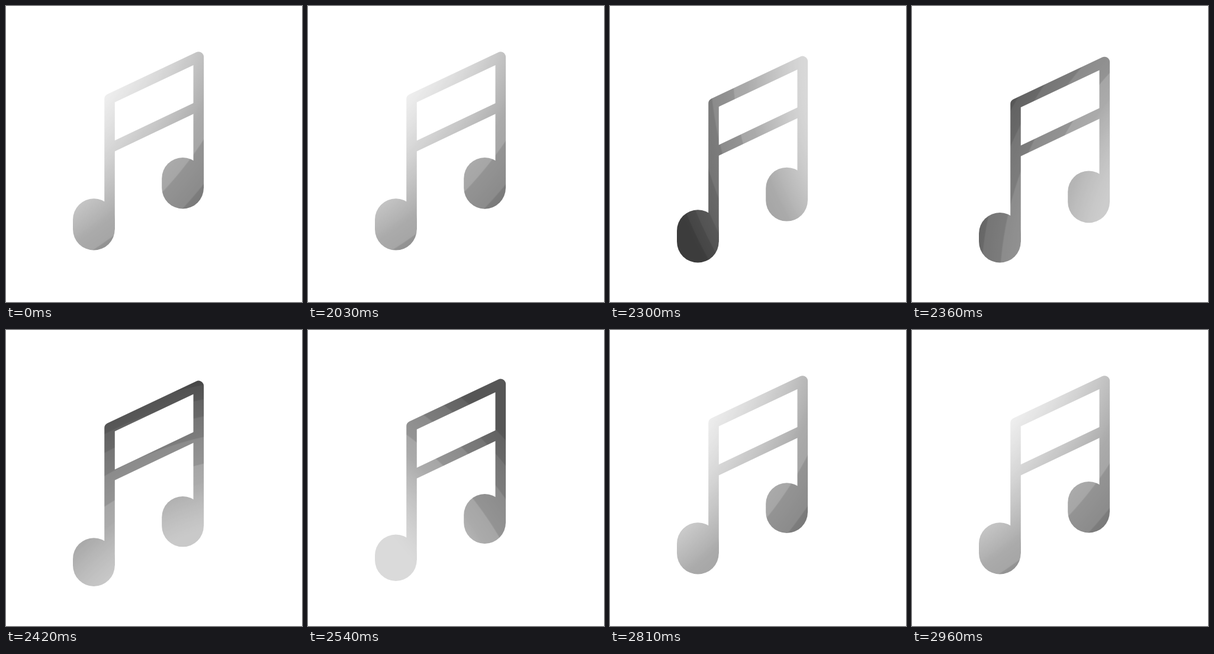
These frames come from a looping animation (500 by 500 pixels, 2.99 s). An HTML page with a canvas:

```html
<!DOCTYPE html>
<html lang="en">
<head>
<meta charset="utf-8">
<title>Music note</title>
<style>
  html, body { margin: 0; width: 100%; height: 100%; overflow: hidden; background: #fff; }
  canvas { display: block; width: 500px; height: 500px; }
</style>
</head>
<body>
<canvas id="stage" width="500" height="500"></canvas>
<script>
const ctx = document.getElementById('stage').getContext('2d');
const LOOP = 2990, START = 2030, END = 2960, TICK = 30;
const MID = { x: 223, y: 245 }, FAR = 560, REACH = 130;
const LEFT = 175, RIGHT = 325.3, HEAD = 70.8;

const clamp = u => Math.max(0, Math.min(1, u));
const smooth = u => u * u * (3 - 2 * u);
const smoother = u => u * u * u * (u * (6 * u - 15) + 10);

// Rises from 0 to 1, holds, and falls back to 0
const swell = (t, from, top, hold, to) =>
  smooth(clamp((t - from) / (top - from))) * smooth(clamp((to - t) / (to - hold)));

// One full turn that starts briskly and settles slowly
const turn = t => 41 + 360 * smoother(clamp((t - 2005) / 955) ** 0.75);

// Dark tones gather into bands of equal ratio
function banded(v) {
  if (v > 172) return v;
  const base = 60, ratio = 1.19;
  const band = base * ratio ** Math.round(Math.log(v / base) / Math.log(ratio));
  return v + (band - v) * 0.65;
}

// The light sits far off the stage and circles the note
function shade(t) {
  const a = turn(t) * Math.PI / 180;
  const x = MID.x - FAR * Math.cos(a), y = MID.y - FAR * Math.sin(a);
  const light = 245 - 44 * swell(t, 2150, 2400, 2410, 2720);
  const dark = 126 - 68 * swell(t, 2060, 2330, 2330, 2800);
  const g = ctx.createRadialGradient(x, y, FAR - REACH, x, y, FAR + REACH);
  const steps = REACH;
  for (let i = 0; i <= steps; i++) {
    const u = i / steps;
    const v = Math.round(banded(light + (dark - light) * u ** 1.3));
    g.addColorStop(u, `rgb(${v},${v},${v})`);
  }
  return g;
}

function line(width, ...points) {
  ctx.lineWidth = width;
  ctx.beginPath();
  points.forEach(([x, y]) => ctx.lineTo(x, y));
  ctx.stroke();
}

function head(x, top, bottom) {
  const r = HEAD / 2;
  ctx.beginPath();
  ctx.arc(x + r, top + r, r, Math.PI, 0);
  ctx.arc(x + r, bottom - r, r, 0, Math.PI);
  ctx.fill();
}

function draw(t) {
  const drop = 8.6 * swell(t, 2000, 2390, 2390, 2750);
  const leftTop = 325.3 + 26 * swell(t, 2050, 2430, 2430, 2790);
  const leftEnd = 412.5 + 21 * swell(t, 2020, 2290, 2390, 2710);
  const rightTop = 256 + 25 * swell(t, 2110, 2420, 2420, 2900);
  const rightEnd = 342.5 + 24 * swell(t, 2010, 2380, 2400, 2850);

  ctx.fillStyle = '#fff';
  ctx.fillRect(0, 0, 500, 500);
  ctx.fillStyle = ctx.strokeStyle = shade(t);
  ctx.lineJoin = 'round';
  line(17.6, [LEFT, leftEnd - 35], [LEFT, 157 + drop], [RIGHT, 86 + drop], [RIGHT, rightEnd - 35]);
  line(16.4, [LEFT, 240.5 + drop], [RIGHT, 169 + drop]);
  head(113, leftTop, leftEnd);
  head(263.2, rightTop, rightEnd);
}

const begin = performance.now();
function frame() {
  const t = (performance.now() - begin) % LOOP;
  draw(t < START ? END : START + Math.floor((t - START) / TICK) * TICK);
  requestAnimationFrame(frame);
}
frame();
</script>
</body>
</html>
```
